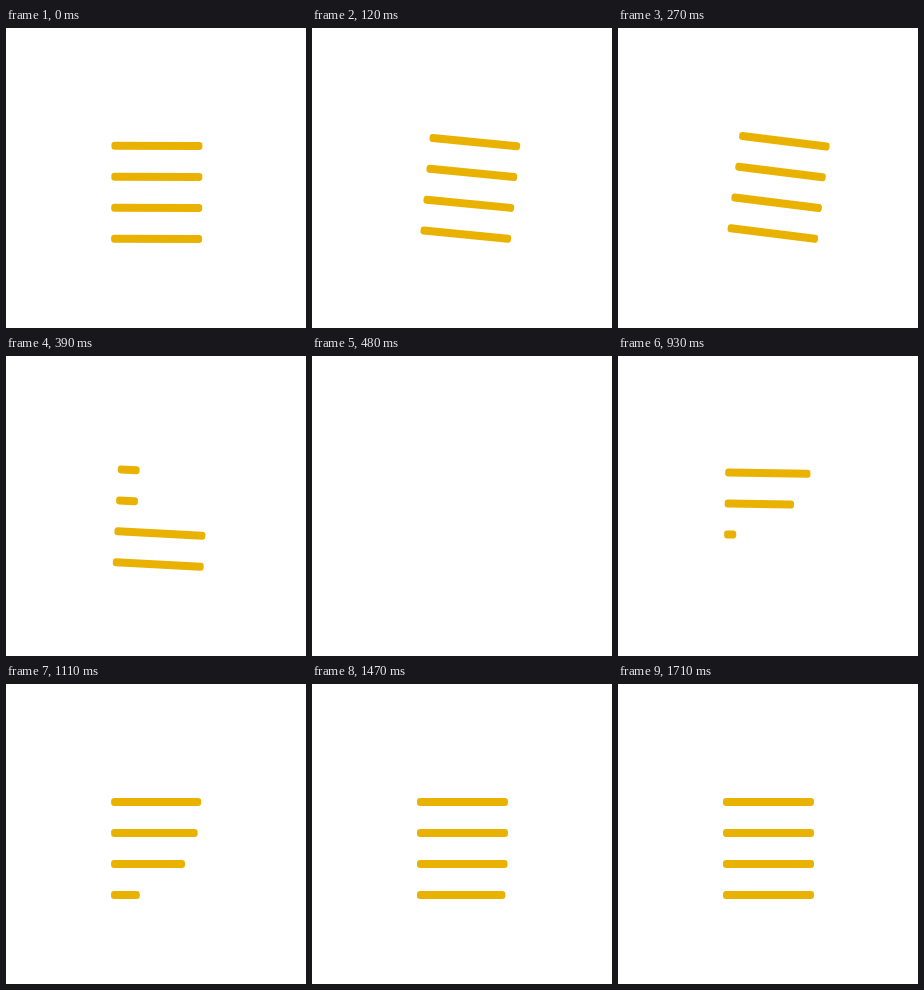
Recreate the animation shown at these times as an HTML page. Size 300 by 300 pixels, loop 4.4 s.

```html
<!DOCTYPE html>
<html lang="en">
<head>
<meta charset="utf-8">
<style>
  html, body { margin: 0; width: 100%; height: 100%; overflow: hidden; background: #fff; }
  svg { display: block; width: 100vw; height: 100vh; }
</style>
</head>
<body>
<svg viewBox="0 0 300 300"><g id="lines" fill="#eab200"></g></svg>
<script>
const LOOP = 4400, STEP = 30;
const LEFT = 105, FULL = 91, THICK = 8, PIVOT = '197 243';
const group = document.getElementById('lines');

const bars = [114, 145, 176, 207].map(y => {
  const bar = document.createElementNS('http://www.w3.org/2000/svg', 'rect');
  const attrs = { x: LEFT, y, height: THICK, rx: 3.2 };
  for (const name in attrs) bar.setAttribute(name, attrs[name]);
  return group.appendChild(bar);
});

const clamp = v => Math.min(1, Math.max(0, v));
const progress = (t, from, to) => clamp((t - from) / (to - from));
const smooth = p => p * p * (3 - 2 * p);
const easeOut = k => p => (1 - Math.exp(-k * p)) / (1 - Math.exp(-k));

// Each swing: start, end, angle to reach (degrees), easing
const swings = [
  [0, 360, 7.35, easeOut(4)],
  [360, 480, -2.1, easeOut(2)],
  [630, 870, 2.1, smooth],
  [870, 1170, 0, easeOut(3.5)]
];

function tilt(t) {
  let angle = 0.2;
  for (const [from, to, target, ease] of swings) {
    angle += (target - angle) * ease(progress(t, from, to));
  }
  return angle;
}

function barLength(t, i) {
  if (t < 480) {
    const start = i < 2 ? 330 : 390;
    const p = progress(t, start, start + 72);
    return p < 1 ? 1 - p : -1;
  }
  const start = 620 + i * 152;
  return t > start ? easeOut(5.3)(progress(t, start, start + 630)) : -1;
}

function draw(now) {
  const t = Math.floor(now % LOOP / STEP) * STEP;
  group.setAttribute('transform', `rotate(${tilt(t)} ${PIVOT})`);
  bars.forEach((bar, i) => {
    const length = barLength(t, i);
    bar.setAttribute('width', length < 0 ? 0 : THICK + (FULL - THICK) * length);
  });
}

let begin;
function tick(now) {
  begin ??= now;
  draw(Math.max(0, now - begin));
  requestAnimationFrame(tick);
}
draw(0);
requestAnimationFrame(tick);
</script>
</body>
</html>
```
